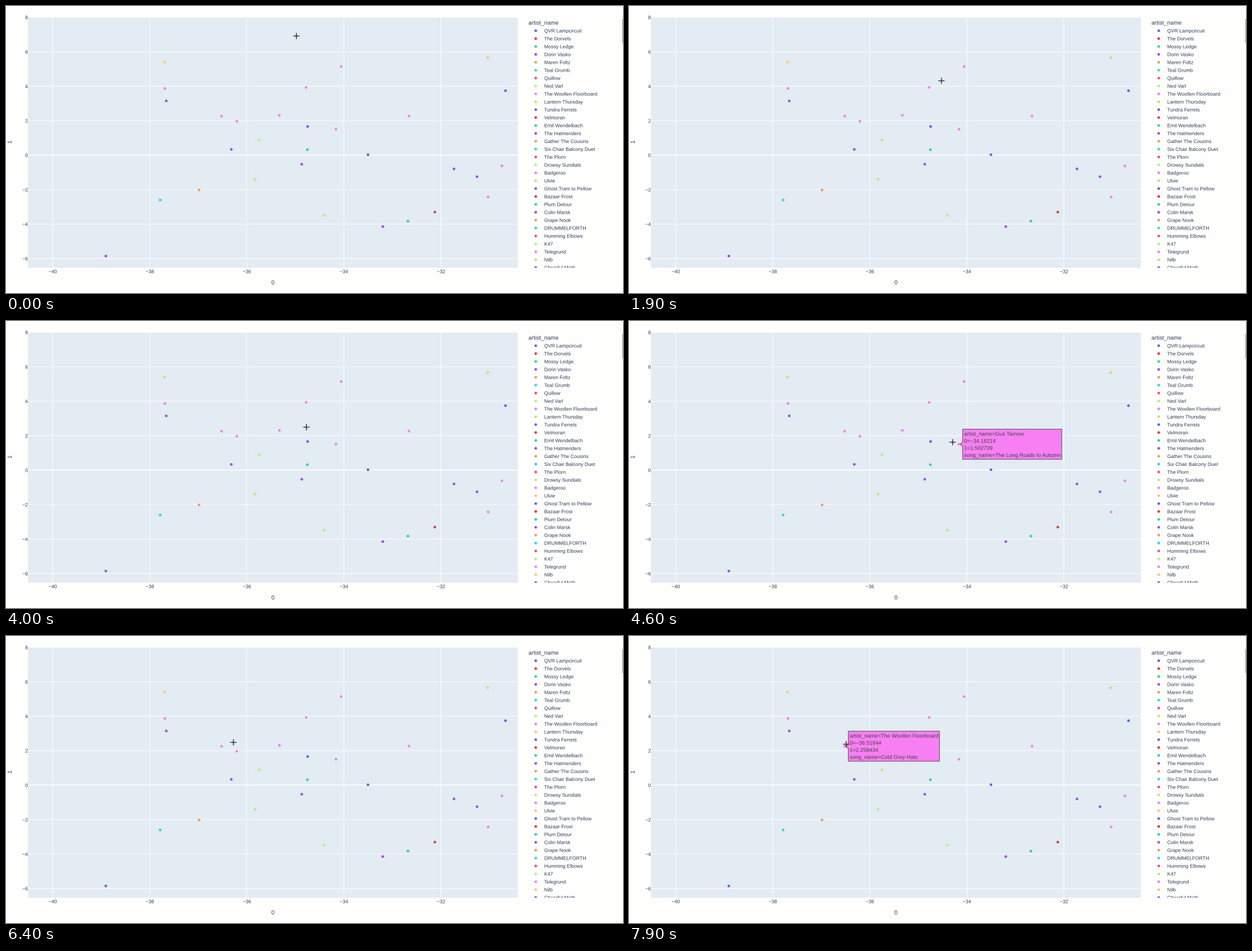
These frames come from a looping animation (1096 by 511 pixels, 8 s). A matplotlib script:

```python
import math

import matplotlib.pyplot as plt
from matplotlib.animation import FuncAnimation
from matplotlib.patches import Circle, PathPatch, Polygon, Rectangle
from matplotlib.textpath import TextPath
from matplotlib.transforms import Affine2D

W, H, DPI = 1096, 511, 64
PT = 72 / DPI  # points per pixel
STEP, LOOP = 100, 8000
HOVER_RADIUS = 20

PAPER, PANEL, INK, DARK = "#fefefd", "#e3ebf3", "#2f3d57", "#444444"
BLUE, RED, GREEN, PURPLE, ORANGE = "#5d67e0", "#d74137", "#1edaa0", "#9e50de", "#f09b5f"
CYAN, ROSE, LIME, PINK, YELLOW = "#23dce8", "#e8508c", "#b4f082", "#f082f0", "#f8c86e"
CYCLE = [BLUE, RED, GREEN, PURPLE, ORANGE, CYAN, ROSE, LIME, PINK, YELLOW]

ARTISTS = [
    "QVR Lampcircuit", "The Dorvels", "Mossy Ledge", "Dorin Vasko", "Maren Foltz",
    "Teal Grumb", "Quillow", "Ned Varl", "The Woollen Floorboard", "Lantern Thursday",
    "Tundra Ferrets", "Velmoran", "Emil Wendelbach", "The Hatmenders",
    "Gather The Cousins", "Six Chair Balcony Duet", "The Plorn", "Drowsy Sundials",
    "Badgeroo", "Ulvie", "Ghost Tram to Pellow", "Bazaar Frost", "Plum Detour",
    "Colin Marsk", "Grape Nook", "DRUMMELFORTH", "Humming Elbows", "K47",
    "Telegrund", "Nilb", "Cheerful Moth",
]

# chart points without a label, in pixels
DOTS = {
    PURPLE: [(284.7, 169), (177.3, 445.2), (400.2, 255.3), (525.4, 281.7),
             (669.3, 392.8), (795.8, 290), (836.7, 304)],
    YELLOW: [(281.5, 100), (855.7, 92)],
    PINK: [(282.2, 146.8), (880.9, 284.6), (856.5, 340)],
    BLUE: [(535.8, 214.6), (643, 264.8), (887.3, 150.8)],
    LIME: [(449.3, 238.4), (442.3, 308.4), (565.3, 372.7)],
    GREEN: [(535.4, 255.8), (714, 383)],
    ORANGE: [(343, 327.5)],
    CYAN: [(273.8, 345.4)],
    RED: [(761.7, 367)],
}

# chart points the cursor visits, in chart units
SONGS = {
    "Letters to a Harbour": ("Badgeroo", -34.05513, 5.140218),
    "Garden by the Lake": ("Gus Tarnow", -34.77642, 3.930157),
    "Slow Tram Home": ("Telegrund", -35.32871, 2.308846),
    "The Long Roads to Autumn": ("Gus Tarnow", -34.16214, 1.502739),
    "Basket from the Ridge": ("Gus Tarnow", -32.65664, 2.262977),
    "Cold Grey Hats": ("The Woollen Floorboard", -36.51844, 2.258434),
    "Cousins of the Quiet Rivers": ("Badgeroo", -36.20517, 1.963382),
}

# cursor moves: begin ms, end ms, song, stop beside its point, ease power, bow
START = (516, 53)
MOVES = [
    (500, 1300, "Letters to a Harbour", 2, 1, 105),
    (1700, 2200, "Garden by the Lake", 1, 2.15, 5),
    (3000, 3400, "Slow Tram Home", 3, 1, 0),
    (3900, 4600, "The Long Roads to Autumn", -11, 4.8, -15),
    (4900, 5300, "Basket from the Ridge", 4, 1.4, 8),
    (6000, 6500, "Cold Grey Hats", 8, 2, -25),
    (6600, 6900, "Cousins of the Quiet Rivers", -4, 1, 0),
    (7600, 7900, "Cold Grey Hats", 3, 2, 0),
]

plt.rcParams["font.family"] = "Liberation Sans"
plt.rcParams["toolbar"] = "None"

fig = plt.figure(figsize=(W / DPI, H / DPI), dpi=DPI, facecolor=PAPER)
ax = fig.add_axes([0, 0, 1, 1])
ax.set_xlim(0, W)
ax.set_ylim(H, 0)
ax.axis("off")


def px(x):
    return 82.9 + 86.2 * (x + 40)


def py(y):
    return 265.5 - 30.68 * y


def box(x0, y0, x1, y1, color, z):
    ax.add_patch(Rectangle((x0, y0), x1 - x0, y1 - y0, fc=color, lw=0, zorder=z))


def line(xs, ys, color, width, z, **kw):
    return ax.plot(xs, ys, color=color, lw=width * PT, zorder=z, snap=False,
                   solid_capstyle="butt", **kw)[0]


def label(x, y, text, size=8.8, align=0, color=INK, z=3, turn=0):
    """Text with its capitals centred on y; align runs from 0 left to 1 right."""
    path = TextPath((0, 0), text, size=size)
    width = path.get_extents().x1
    place = (Affine2D().translate(-align * width, -0.36 * size).scale(1, -1)
             .rotate_deg(turn).translate(x, y))
    patch = PathPatch(place.transform_path(path), fc=color, lw=0, zorder=z, snap=False)
    return ax.add_patch(patch), width


def dot(x, y, color):
    ax.add_patch(Circle((x, y), 2.35, fc=color, lw=0, zorder=4))


def number(v):
    return str(v).replace("-", "\u2212")


def draw_panel():
    box(39, 20, 909, 465.5, PANEL, 0)
    for x in range(-40, -31, 2):
        line([px(x)] * 2, [20, 465.5], "white", 1, 1)
        label(px(x), 472.5, number(x), align=0.5)
    for y in range(-6, 9, 2):
        line([39, 909], [py(y)] * 2, "white", 1 if y else 1.7, 1)
        label(38.5, py(y) + 0.2, number(y), align=1)
    label(474, 492, "0", 10.27, align=0.5)
    label(6.3, 242.5, "1", 10.27, align=0.5, turn=-90)
    for color, spots in DOTS.items():
        for spot in spots:
            dot(*spot, color)
    for _, x, y in SONGS.values():
        dot(px(x), py(y), PINK)


def draw_legend():
    label(928, 29.5, "artist_name", 10.27)
    for i, name in enumerate(ARTISTS):
        y = 44 + 14.055 * i
        dot(941, y, CYCLE[i % len(CYCLE)])
        label(956, y, name)
    box(920, 466, 1090, 480, PAPER, 5)
    box(1094.8, 23, W, 66, "#85888c", 5)


def make_hover(song, artist, x, y):
    cx, cy = px(x), py(y)
    rows = [f"artist_name={artist}", f"0={number(x)}", f"1={number(y)}",
            f"song_name={song}"]
    texts, widths = zip(*(
        label(cx + 9, cy + 12.6 * (i - 1.5) + 0.2, row, 9.55, color=DARK, z=7)
        for i, row in enumerate(rows)))
    left, right = cx + 6.5, cx + 11.5 + max(widths)
    top, bottom = cy - 26.8, cy + 26.8
    outline = [(cx + 2.1, cy), (left, cy - 4.4), (left, top), (right, top),
               (right, bottom), (left, bottom), (left, cy + 4.4)]
    frame = Polygon(outline, fc="#f77ff3", ec=DARK, lw=0.9 * PT, zorder=6)
    return [ax.add_patch(frame), *texts]


def cursor_at(t):
    """Cursor position and the song whose point it is heading for or resting on."""
    x, y, song = *START, None
    for begin, end, target, side, power, bow in MOVES:
        if t <= begin:
            break
        song = target
        _, sx, sy = SONGS[song]
        u = 1 - (1 - min(1, (t - begin) / (end - begin))) ** power
        x += (px(sx) + side - x) * u
        y += (py(sy) - 4 - y) * u + bow * math.sin(math.pi * u)
    return x, y, song


draw_panel()
draw_legend()
hovers = {song: make_hover(song, *info) for song, info in SONGS.items()}
shadow = [line([], [], "#70757c", 1.2, 8, alpha=0.3) for _ in range(2)]
cross = [line([], [], "#1c1c1c", 1.2, 9) for _ in range(2)]


def place_cross(arms, x, y):
    arms[0].set_data([x - 5.5, x + 5.5], [y, y])
    arms[1].set_data([x, x], [y - 5.5, y + 5.5])


def update(n):
    x, y, target = cursor_at(n * STEP)
    place_cross(shadow, x + 0.7, y + 1)
    place_cross(cross, x - 0.3, y + 0.3)
    for song, parts in hovers.items():
        _, sx, sy = SONGS[song]
        near = math.hypot(px(sx) - x, py(sy) - y) < HOVER_RADIUS
        for part in parts:
            part.set_visible(near and song == target)
    return shadow + cross + sum(hovers.values(), [])


anim = FuncAnimation(fig, update, frames=LOOP // STEP, interval=STEP,
                     repeat=True, repeat_delay=0, blit=False)
plt.show()
```
